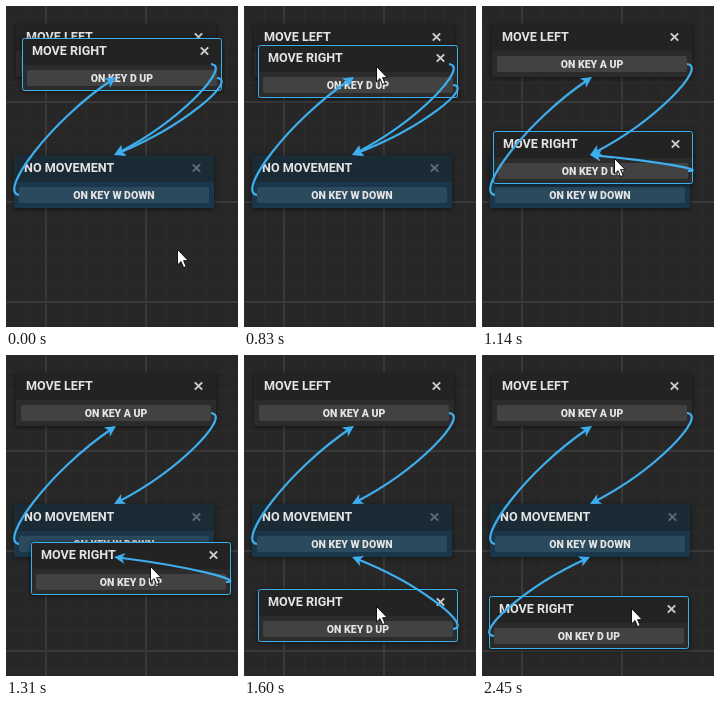
Write an HTML page with a canvas that moves like this. It is 232 px wide and 321 px high and loops after 2680 ms.

```html
<!DOCTYPE html>
<html lang="en">
<head>
<meta charset="utf-8">
<title>State graph</title>
<style>
  html, body { margin: 0; width: 100%; height: 100%; overflow: hidden; background: #272727; }
  canvas { display: block; }
</style>
</head>
<body>
<canvas id="stage" width="232" height="321"></canvas>
<script>
const LOOP = 2680;
const STEP = 1000 / 13;
const WIRE = '#3daeee';
const ctx = document.getElementById('stage').getContext('2d');

const GREY = { head: '#232323', body: '#2b2b2b', button: '#424242', cross: '#cfcfcf' };
const BLUE = { head: '#1a2b35', body: '#19364a', button: '#2b4a5d', cross: '#5c6d77' };

const moveLeft = { x: 10, y: 18, title: 'MOVE LEFT', label: 'ON KEY A UP', theme: GREY };
const noMovement = { x: 8, y: 149, title: 'NO MOVEMENT', label: 'ON KEY W DOWN', theme: BLUE };
const moveRight = { x: 16, y: 32, title: 'MOVE RIGHT', label: 'ON KEY D UP', theme: GREY };

// Key points of the drag, in refresh steps
const DRAG = [
  { step: -1, x: 16, y: 32 },
  { step: 2, x: 9, y: 75 },
  { step: 4, x: 11, y: 125 },
  { step: 6, x: 25, y: 187 },
  { step: 8, x: 21, y: 222 },
  { step: 13, x: 7, y: 241 }
];
const LAST = DRAG.length - 1;

const lerp = (a, b, u) => a + (b - a) * u;
const smooth = u => u * u * (3 - 2 * u);

// Whole refresh steps since start, from -1 before it up to last
const stepsSince = (start, time, last) =>
  Math.max(-1, Math.min(last, Math.floor((time - start + 2) / STEP)));

function slope(i, axis) {
  if (i === 0 || i === LAST) return 0;
  const a = DRAG[i - 1], b = DRAG[i + 1];
  return (b[axis] - a[axis]) / (b.step - a.step);
}

// Cubic Hermite curve through the key points
function dragAt(step, axis) {
  step = Math.min(step, DRAG[LAST].step);
  let i = 0;
  while (i < LAST - 1 && step >= DRAG[i + 1].step) i++;
  const a = DRAG[i], b = DRAG[i + 1];
  const span = b.step - a.step, u = (step - a.step) / span, v = 1 - u;
  return Math.round(lerp(a[axis], b[axis], smooth(u)) +
    span * u * v * (slope(i, axis) * v - slope(i + 1, axis) * u));
}

function pointerAt(time, dragStep) {
  if (time >= 2450) return [149, 253];
  if (dragStep >= 0) {
    const ahead = dragStep + .4;   // the card lags behind the hand
    return [dragAt(ahead, 'x') + 119, dragAt(ahead, 'y') + 15];
  }
  const u = smooth((stepsSince(70, time, 6) + 1) / 7);
  return [Math.round(lerp(171, 135, u)), Math.round(lerp(243, 47, u))];
}

function rect(color, x, y, w, h, radius = 0) {
  ctx.fillStyle = color;
  ctx.beginPath();
  ctx.roundRect(x, y, w, h, radius);
  ctx.fill();
}

function drawGridLines(color, gap, width) {
  for (let x = 40 % gap; x < 232; x += gap) rect(color, x - width + 1, 0, width, 321);
  for (let y = 96 % gap; y < 321; y += gap) rect(color, 0, y - width + 1, 232, width);
}

function drawCard({ x, y, title, label, theme }, border) {
  ctx.save();
  ctx.shadowColor = 'rgba(0,0,0,.55)';
  ctx.shadowBlur = 5;
  ctx.shadowOffsetY = 1;
  rect(theme.body, x, y, 200, 53, 2);
  ctx.restore();
  rect(theme.head, x, y, 200, 27, [2, 2, 0, 0]);
  rect(theme.button, x + 5, y + 32, 190, 16, 2);

  ctx.fillStyle = '#e4e4e4';
  ctx.textAlign = 'left';
  ctx.font = 'bold 12.6px Roboto, sans-serif';
  ctx.fillText(title, x + 10, y + 17);
  ctx.textAlign = 'center';
  ctx.font = '900 10.5px Roboto, sans-serif';
  ctx.fillText(label, x + 100, y + 44);

  const cx = x + 182.5, cy = y + 13, r = 3.7;
  ctx.strokeStyle = theme.cross;
  ctx.lineWidth = 1.9;
  ctx.beginPath();
  ctx.moveTo(cx - r, cy - r); ctx.lineTo(cx + r, cy + r);
  ctx.moveTo(cx + r, cy - r); ctx.lineTo(cx - r, cy + r);
  ctx.stroke();

  if (border) {
    ctx.strokeStyle = border;
    ctx.lineWidth = 1;
    ctx.beginPath();
    ctx.roundRect(x + .5, y + .5, 199, 52, 2);
    ctx.stroke();
  }
}

// Leaves a button on its outer side and lands on the facing edge of the other card.
function drawWire(from, to) {
  const side = from.x < to.x ? -1 : 1;
  const x0 = from.x + (side < 0 ? 5 : 195), y0 = from.y + 40;
  const x3 = to.x + 100, y3 = to.y + (from.y < to.y ? 0 : 53);
  const x2 = lerp(x0, x3, .31), y2 = lerp(y0, y3, .62);
  const angle = Math.atan2(y3 - y2, x3 - x2);

  ctx.strokeStyle = ctx.fillStyle = WIRE;
  ctx.lineWidth = 2.2;
  ctx.beginPath();
  ctx.moveTo(x0, y0);
  ctx.bezierCurveTo(x0 + side * 21, lerp(y0, y3, .02), x2, y2,
    x3 - 4 * Math.cos(angle), y3 - 4 * Math.sin(angle));
  ctx.stroke();

  ctx.save();
  ctx.translate(x3, y3);
  ctx.rotate(angle);
  ctx.fill(new Path2D('M0 0L-11 -5.5L-8 0L-11 5.5Z'));
  ctx.restore();
}

const arrow = new Path2D('M.5 .5V16L4 12.6L6.6 18.6L9.2 17.5L6.6 11.7H11.3Z');

function drawPointer(x, y) {
  ctx.save();
  ctx.translate(x, y);
  ctx.fillStyle = '#fff';
  ctx.strokeStyle = '#111';
  ctx.lineWidth = 1;
  ctx.fill(arrow);
  ctx.stroke(arrow);
  ctx.restore();
}

function draw(time) {
  const dragStep = stepsSince(830, time, 13);
  moveRight.x = dragAt(dragStep, 'x');
  moveRight.y = dragAt(dragStep, 'y');

  rect('#272727', 0, 0, 232, 321);
  drawGridLines('#2c2c2c', 20, 1);
  drawGridLines('#393939', 100, 2);
  drawCard(moveLeft);
  drawCard(noMovement);
  drawCard(moveRight, dragStep === 2 ? '#b4b8ba' : WIRE);
  drawWire(noMovement, moveLeft);
  drawWire(moveLeft, noMovement);
  drawWire(moveRight, noMovement);
  drawPointer(...pointerAt(time, dragStep));
}

const start = performance.now();
function frame() {
  draw((performance.now() - start) % LOOP);
  requestAnimationFrame(frame);
}
frame();
</script>
</body>
</html>
```
